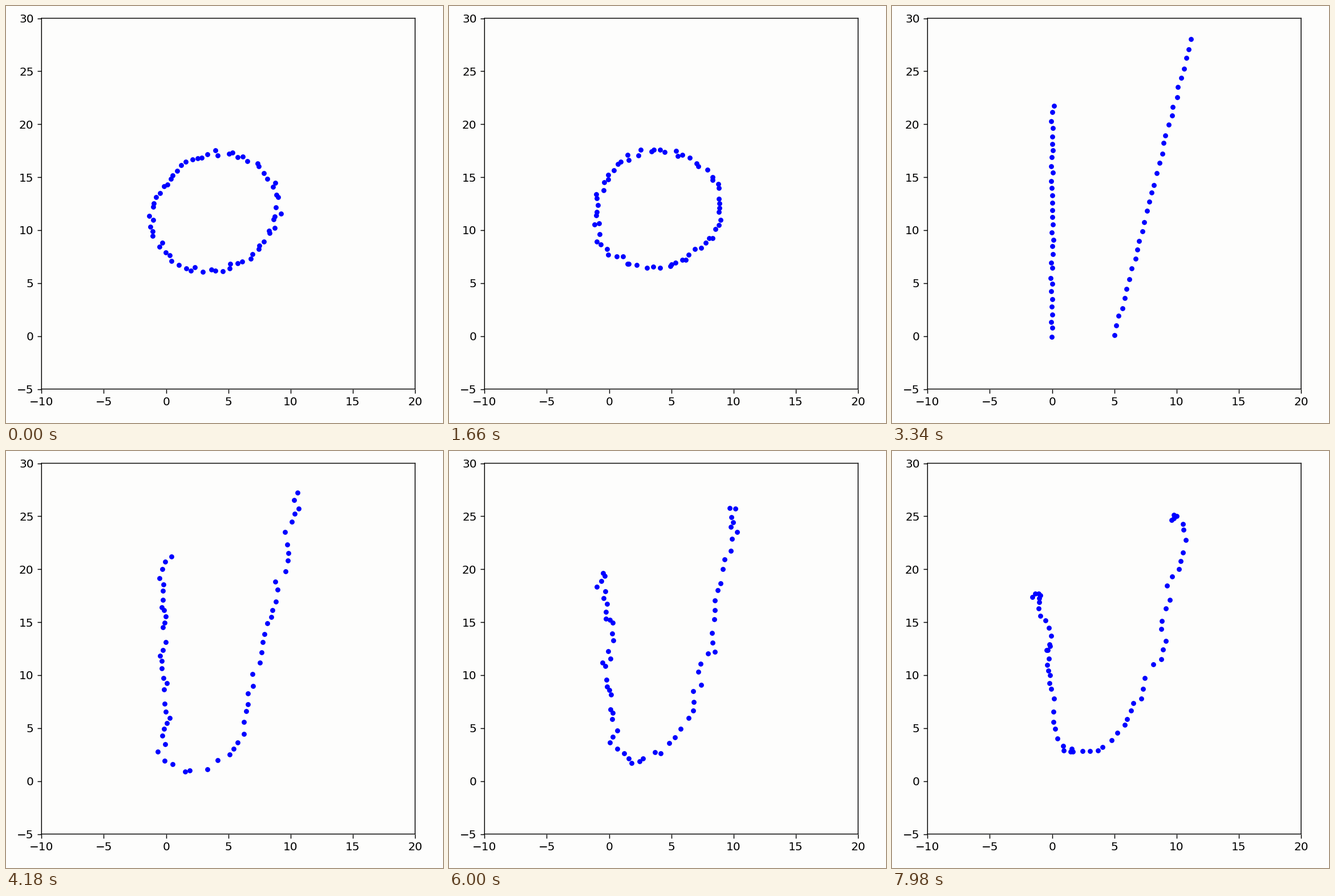
A matplotlib script that plays this animation: 766 px wide and 731 px high, repeating every 8 s.

```python
import numpy as np
import matplotlib.pyplot as plt
from matplotlib.animation import FuncAnimation

W, H, DPI = 766, 731, 128
PT = 1.1            # keeps line and text weights in step with the dpi
TICK_MS, LOOP_MS = 20, 8000
N, HALF = 64, 32    # points in the chain, points per line
START, LAST = 72, 172   # step at which the lines appear, last step

BG = "#fdfdfc"
rng = np.random.default_rng(11)

plt.rcParams.update({"font.family": "DejaVu Sans", "font.size": 10.2 * PT})


def step_at(ms):
    """Steps come in threes that last 20, 20 and 100 ms."""
    block, rest = divmod(ms + 20, 140)
    return 3 * block + min(rest // 20, 2)


def jitter(size):
    return rng.normal(0, size, (N, 2))


def ring(k):
    """Slightly tilted oval that rounds off and rises."""
    a = np.radians(125) + 2 * np.pi * np.arange(N) / N
    tilt = 0.055 * max(0, 1 - (k / 50) ** 2)
    r = 0.97 + tilt * np.sin(2 * a)
    x = 3.9 - 0.002 * k + 5.15 * r * np.cos(a)
    y = 11.68 + 0.009 * k + 5.7 * r * np.sin(a)
    return np.column_stack([x, y])


def ring_phase(pull=0.9):
    """The ring with each point wandering around its place."""
    drift = jitter(0.17)
    for k in range(START):
        drift = pull * drift + jitter(0.07)
        yield ring(k) + drift


def lines():
    i = np.arange(HALF)
    left = np.column_stack([0 * i, 0.7 * i[::-1]])
    right = np.column_stack([5 + 0.2 * i, 0.903 * i])
    return np.vstack([left, right])


def chain_phase(stiffness=0.14):
    """Two lines joined at the bottom: each point is drawn to its neighbours."""
    p = lines() + jitter(0.07)
    for _ in range(START, LAST + 1):
        yield p
        padded = np.vstack([p[:1], p, p[-1:]])
        p = p + stiffness * np.diff(padded, n=2, axis=0) + jitter(0.13)


path = [*ring_phase(), *chain_phase()]

fig = plt.figure(figsize=(W / DPI, H / DPI), dpi=DPI, facecolor=BG)
ax = fig.add_axes([62.3 / W, (H - 671.5) / H, 654.8 / W, 650 / H], facecolor=BG)
ax.set(xlim=(-10, 20), ylim=(-5, 30),
       xticks=range(-10, 21, 5), yticks=range(-5, 31, 5))
ax.tick_params(length=3.5 * PT, width=0.75 * PT, pad=3.5 * PT)
for spine in ax.spines.values():
    spine.set(linewidth=0.75 * PT, snap=False)
dots, = ax.plot([], [], ".", color="blue", ms=7 * PT, mew=PT)


def draw(frame):
    dots.set_data(*path[step_at(frame * TICK_MS)].T)
    return dots,


anim = FuncAnimation(fig, draw, frames=LOOP_MS // TICK_MS, interval=TICK_MS,
                     init_func=lambda: draw(0), repeat=True, repeat_delay=0)
plt.show()
```
